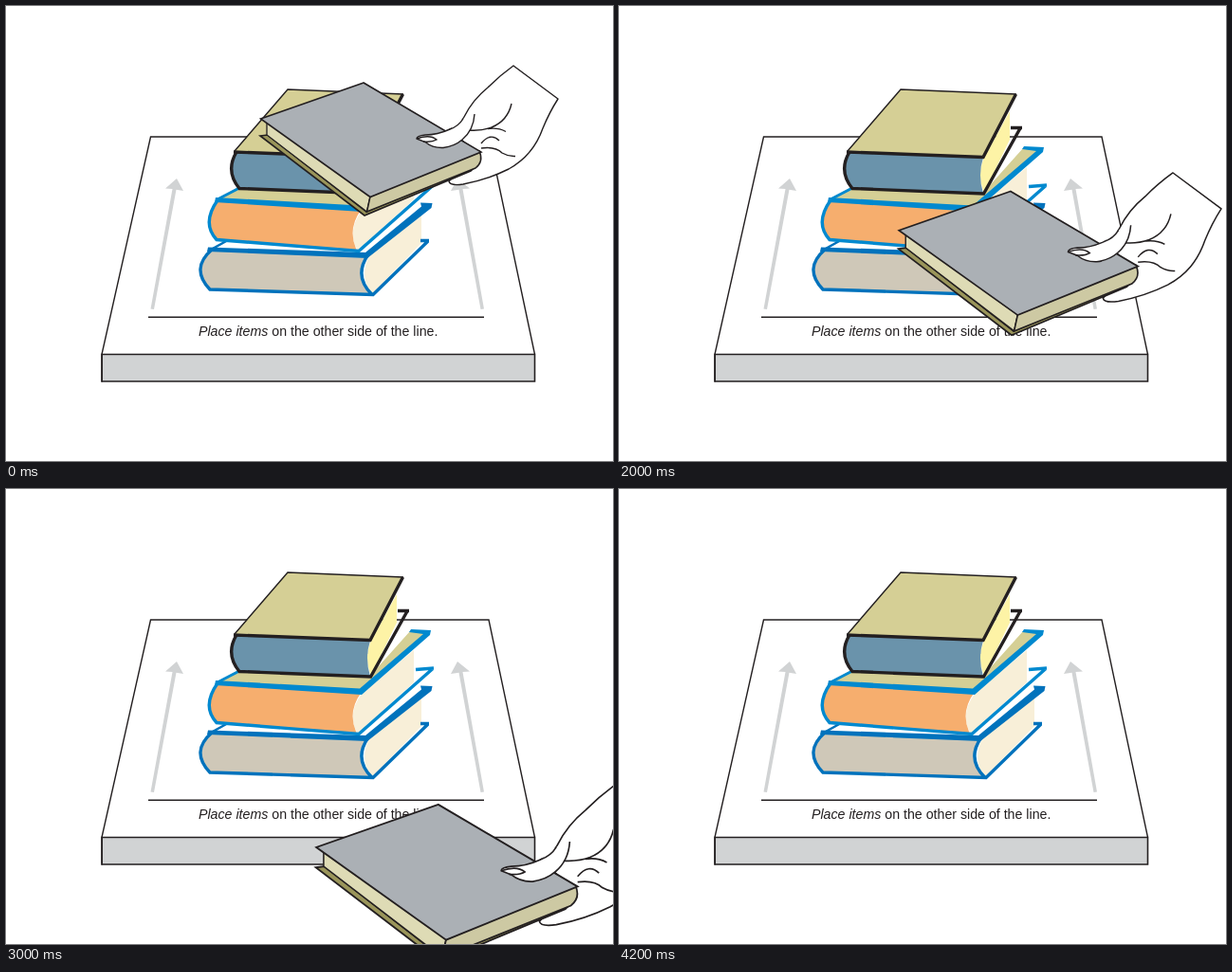
These frames come from a looping animation (640x480 px, 5000 ms). An HTML page:

```html
<!DOCTYPE html>
<html lang="en">
<head>
<meta charset="utf-8">
<title>Place items</title>
<style>
html, body { margin: 0; width: 100%; height: 100%; overflow: hidden; background: #fff; }
svg { display: block; width: 100vw; height: 100vh; }
path { stroke-linejoin: miter; }
text { font: 14.2px "Liberation Sans", Arial, sans-serif; fill: #231f20; }
.ink { fill: none; stroke: #231f20; stroke-width: 1.4; }
.sky { fill: none; stroke: #0089cf; }
.blue { fill: none; stroke: #0072bc; }
.skin { fill: #fff; stroke: #231f20; stroke-width: 1.4; stroke-linejoin: round; }
</style>
</head>
<body>
<svg viewBox="0 0 640 480">
  <g id="table">
    <path class="ink" d="M101 367.5 152.5 138H509L557.5 367.5"/>
    <path d="M101 367.5H557.5V396H101Z" fill="#d1d3d4" stroke="#231f20" stroke-width="1.6"/>
    <path class="ink" d="M101.3 367V396.5" stroke-width="2"/>
    <g fill="#d1d3d4">
      <path d="M152.500 319.500 175.500 193 168 192.500 180 182 187 195 179.500 193.700 156 320Z"/>
      <path d="M504 319.500 481.500 193 489 192.500 476 182 469 195 477.500 193.700 500.500 320Z"/>
    </g>
    <path class="ink" d="M150 328.300H504"/>
    <text x="203" y="347.500"><tspan font-style="italic">Place items</tspan> on the other side of the line.</text>
  </g>

  <g id="grayBook">
    <path d="M383 263 438 219V250L386 304Q372 287 383 263Z" fill="#f8efd8"/>
    <path d="M216 258Q193 276 215 299L386 304Q366 286 381 263Z" fill="#cfc8b8"/>
    <path class="blue" stroke-width="3.400" d="M217 257Q194 277 215 299L387 304.500 445 248M437 247.500H446M382 262Q366 285 386 304.500"/>
    <path class="blue" stroke-width="2.500" d="M216 257 234 247"/>
    <path d="M213 254.500 379 260 438 211.500 437 207.500 449.500 208 448.500 213 381 266 212 259Z" fill="#0072bc"/>
  </g>

  <g id="orangeBook">
    <path d="M222 204 245 191 384 197 426 150 445 152 374 213Z" fill="#d5cf95"/>
    <path d="M376 215 430 170V204L371 258Q358 238 376 215Z" fill="#f8efd8"/>
    <path d="M222 206Q208 226 222 246L370 258Q359 236 375 214Z" fill="#f6ae6e"/>
    <path class="sky" stroke-width="3.400" d="M223 205Q206 229 222 246.500L372 258.500 450 189.500M432 190.500 451 189"/>
    <path class="sky" stroke-width="3" d="M222 204.500 246 192"/>
    <path d="M221 202 373 210.500 440 153 425 151 427 148 448 149 447 154 375 217 220 207Z" fill="#0089cf"/>
  </g>

  <g id="blueBook">
    <path d="M385 160 412 111V141L385 197Q377 178 385 160Z" fill="#fdf3a6"/>
    <path d="M242 154Q233 172 246 192L384 197.500Q378 178 384 160Z" fill="#6a93ab"/>
    <path class="ink" style="stroke-width:3.400" d="M243 154Q231 174 246 192.500L384.500 198 423 129M413 128.500H425"/>
    <path d="M297 88 419 93 384 159 241 153Z" fill="#d5cf95"/>
    <path class="ink" d="M241 153 297 88 419 93"/>
    <path class="ink" style="stroke-width:3.400" d="M240 154 384 159.500 418.500 93"/>
  </g>

  <g id="carried">
    <path class="skin" d="M535 63 582 98Q573 112 566 129C559 149 548 162 530 172Q508 183 482 188Q468 190 467 185L475 176 490 150 468 130Q479 125 483 117Q492 99 508 86Q521 73 535 63Z"/>
    <path class="ink" d="M488 131Q501 132 512 128Q529 121 533 103M508 129.500Q519 128 527 132.500M501 145Q511 133 520 142M501 150Q516 148 523 155Q530 159 537 158.500"/>

    <path d="M268 137 276 136 380 217 495 169 490 174 378 221Z" fill="#9a955a" stroke="#231f20" stroke-width="1.600"/>
    <path d="M275 122 384 201 380.500 217 275 136Z" fill="#dedbb5" stroke="#231f20" stroke-width="1.300"/>
    <path d="M384 201 499 153Q504 164 495 171L380.500 217Z" fill="#cdc9a3" stroke="#231f20" stroke-width="1.500"/>
    <path d="M377 81 268.500 119 384 201.500 501 154Z" fill="#abb0b5" stroke="#231f20" stroke-width="1.600"/>

    <path d="M480 120 468 130Q455 136 442 136Q433 137 433 140L442 143.500Q450 150 461 149.500Q473 148 481 141Q492 131 494 114Z" fill="#fff"/>
    <path class="ink" d="M482 119Q477 127 468 130Q455 136 442 136Q433 137 433 140L442 143.500Q450 150 461 149.500Q473 148 481 141Q493 131 494 114"/>
    <path class="ink" d="M433 140Q447 135 454 141Q449 144 440 143"/>
  </g>
</svg>
<script>
const LOOP = 5000, HOLD = 1400, STEP = 200;
const carried = document.getElementById("carried");

// Twelve moves per second, shown every 200 ms.
function draw(time) {
  const t = time % LOOP;
  const n = t < HOLD ? 0 : Math.floor((t - HOLD) / STEP) + 1;
  const k = Math.floor(2.4 * n + 0.41);
  const x = 377 + 3.58 * k, y = 81 + 11.45 * k, size = 1 + 0.0084 * k;
  carried.setAttribute("transform",
    `translate(${x} ${y}) scale(${size}) translate(-377 -81)`);
  carried.style.display = t < 4200 ? "" : "none";
}

const start = performance.now();
function tick() {
  draw(performance.now() - start);
  requestAnimationFrame(tick);
}
tick();
</script>
</body>
</html>
```
